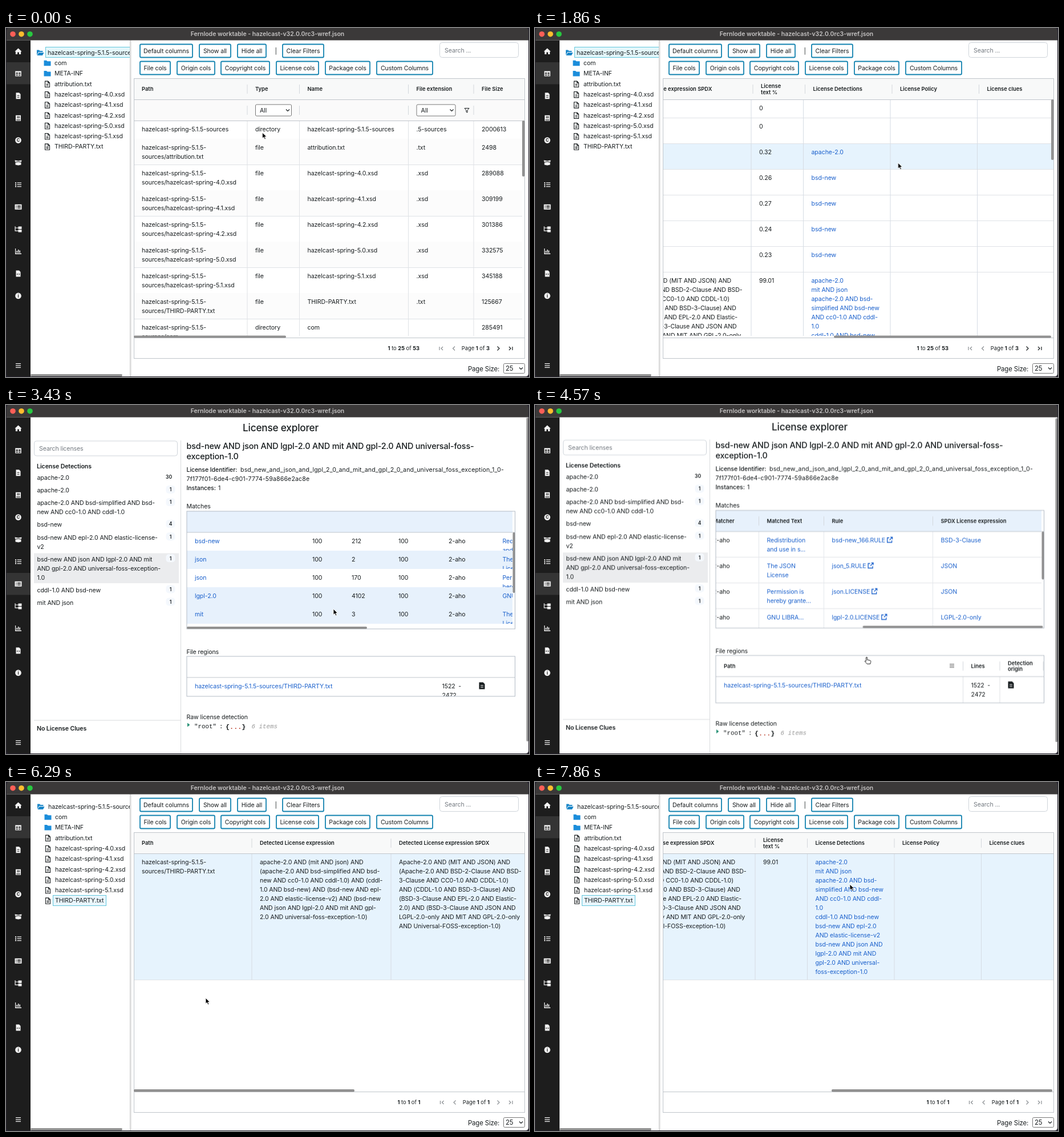
An HTML page that plays this animation: 917 by 611 pixels, repeating every 8000 ms.

```html
<!DOCTYPE html>
<html lang="en">
<head>
<meta charset="utf-8">
<title>License table</title>
<style>
html, body { margin: 0; width: 100%; height: 100%; overflow: hidden; background: #fff; }
#stage { display: block; width: 917px; height: 611px; }
text { font: 10.6px Inter, sans-serif; letter-spacing: -.1px; fill: #181d1f; white-space: pre; }
.head { font-size: 9.4px; font-weight: 600; letter-spacing: 0; }
.foot { font-size: 9.3px; letter-spacing: 0; }
.bold { font-weight: 600; }
.medium { font-weight: 500; }
.link { fill: #1a60cc; }
.hint { fill: #747a80; }
.ident { letter-spacing: .14px; }
.title { font-size: 17.2px; font-weight: 500; letter-spacing: -.2px; }
.name { font-size: 14.4px; font-weight: 500; letter-spacing: -.16px; }
.size { font-size: 11.3px; }
.badge { font-size: 8.6px; font-weight: 600; text-anchor: middle; }
.mono { font: 10.8px "Liberation Mono", monospace; letter-spacing: 0; }
.bar { font-weight: 600; font-size: 10.5px; letter-spacing: 0; fill: #c6c4c4; text-anchor: middle; }
.end { text-anchor: end; }
.mid { text-anchor: middle; }
.glyph { font-size: 7.5px; font-weight: 700; fill: #1e1e1e; text-anchor: middle; }
</style>
</head>
<body>
<svg id="stage" viewBox="0 0 917 611"></svg>
<script>
const FRAMES = 56, INK = '#181d1f', LINK = '#1a60cc', EDGE = '#c0c5cb', RULE = '#dfe2e6', THUMB = '#919191', HOVER = '#e6f3fd';
const stage = document.getElementById('stage');
const sheet = document.head.appendChild(document.createElement('style'));
let tracks = 0;

// --- drawing helpers; y of a text is its middle
function add(parent, tag, attrs = {}) {
  const node = document.createElementNS('http://www.w3.org/2000/svg', tag);
  for (const key in attrs) node.setAttribute(key, attrs[key]);
  return parent.appendChild(node);
}
const group = (p, x = 0, y = 0) => add(p, 'g', { transform: `translate(${x} ${y})` });
const rect = (p, x, y, width, height, fill, more) => add(p, 'rect', { x, y, width, height, fill, ...more });
const frame = (p, x, y, w, h, stroke, more) => rect(p, x + .5, y + .5, w - 1, h - 1, 'none', { stroke, ...more });
const clip = (p, x, y, width, height) => add(p, 'svg', { x, y, width, height, viewBox: `${x} ${y} ${width} ${height}` });
const shape = (p, x, y, d, fill = INK) => add(p, 'path', { d, fill, 'fill-rule': 'evenodd', transform: `translate(${x} ${y})` });
const stroke = (p, x, y, d, color = INK, width = 1.2) =>
  add(p, 'path', { d, fill: 'none', stroke: color, 'stroke-width': width, transform: `translate(${x} ${y})` });
const thumb = (p, x, y, w, h) => rect(p, x, y, w, h, THUMB, { rx: 2 });
function text(p, x, y, content, cls = '') {
  const node = add(p, 'text', { x, y, dy: '.36em', class: cls });
  node.innerHTML = content;
  return node;
}
const lines = (p, x, y, list, cls, step = 16) => list.forEach((s, i) => text(p, x, y + i * step, s, cls));
const tick = (p, x, y) => rect(p, x - .5, y - 8, 1, 16, '#d3d7dc');

// --- motion helpers; stops are [step, ...values], stepped at seven pictures a second
function play(node, stops, css, hold) {
  const name = 'track' + tracks++;
  const keys = stops.map(([n, ...v], i) => {
    const count = hold ? 1 : (stops[i + 1]?.[0] ?? FRAMES) - n;
    return `${n / FRAMES * 100}%{${css(...v)};animation-timing-function:steps(${count})}`;
  });
  keys.push(`100%{${css(...stops.at(-1).slice(1))}}`);
  sheet.append(`@keyframes ${name}{${keys.join('')}}\n`);
  node.style.animation = `${name} 8s -5ms infinite`;
}
const move = (node, ...stops) => play(node, stops, (x, y = 0) => `transform:translate(${x}px,${y}px)`);
function show(node, ...ranges) {
  const stops = ranges[0][0] ? [[0, 0]] : [];
  for (const [from, to] of ranges) {
    stops.push([from, 1]);
    if (to < FRAMES) stops.push([to, 0]);
  }
  play(node, stops, o => `opacity:${o}`, true);
  return node;
}

const DOC = 'M-4-5.5H1.5L4-3V5.5H-4ZM-2-1V0H2V-1ZM-2 2V3H2V2Z';
const DOWN = 'M-3-1.5L0 1.5 3-1.5';
const MENU = 'M-4.5-4h9v1.3h-9zM-4.5-.6h9v1.3h-9zM-4.5 2.7h9V4h-9z';
const DISC = 'M-5.3 0a5.3 5.3 0 1 0 10.6 0a5.3 5.3 0 1 0-10.6 0Z';

function select(p, x, y, w, h, label, cls) {
  rect(p, x, y, w, h, '#fff');
  frame(p, x, y, w, h, '#777', { rx: 2 });
  text(p, x + (cls ? 4 : 8), y + h / 2, label, cls);
  stroke(p, x + w - 7, y + h / 2, DOWN);
}

// --- table page
rect(stage, 0, 0, 917, 611, '#fff');
const table = group(stage);

function fileTree() {
  const view = clip(table, 43, 21, 174, 590);
  const box = { stroke: '#62c6dc' };
  show(rect(view, 69.5, 33.5, 160, 18, '#e4f7fb', box), [0, 23]);
  show(rect(view, 82.5, 198.5, 93, 18, '#e9f6fd', box), [23, FRAMES]);
  const tree = group(view);
  shape(tree, 60, 43.5, 'M-6-5H-2L-.5-3.5H4.5V-1.5H-3L-6 4ZM-2.5-.5H6.5L4 4.5H-5.5Z', '#1b87c9');
  text(tree, 73, 43, 'hazelcast-spring-5.1.5-sources');
  const names = ['com', 'META-INF', 'attribution.txt', ...['4.0', '4.1', '4.2', '5.0', '5.1'].map(v => `hazelcast-spring-${v}.xsd`), 'THIRD-PARTY.txt'];
  names.forEach((name, i) => {
    const y = 61.3 + i * 18.28;
    if (i < 2) shape(tree, 72.5, y + .5, 'M-6-5H-1.5L0-3.5H6V4.5H-6Z', '#1b8ddb');
    else stroke(tree, 72.5, y + .5, 'M-4-5.2H1.2L4-2.4V5.2H-4ZM1-5V-2.2H4M-2 .3H2M-2 2.6H2', INK, 1.1);
    text(tree, 85, y, name);
  });
  move(tree, [0, 0], [22, 0], [23, 1]);
  thumb(table, 43, 606, 161, 4);
  ['#cfcfcf', '#e2e2e2', '#eee', '#f7f7f7'].forEach((c, i) => rect(table, 217 + i, 21, 1, 590, c));
}

function toolbar() {
  const button = (x, right, y, label) => {
    rect(table, x + 1, y + 1, right - x - 2, 23, '#fff', { rx: 2, stroke: '#1483b0', 'stroke-width': 1.8 });
    text(table, (x + right) / 2, y + 12.2, label, 'mid');
  };
  [[234, 328, 'Default columns'], [338, 395, 'Show all'], [405, 457, 'Hide all'], [484, 558, 'Clear Filters']].forEach(([a, b, s]) => button(a, b, 27.5, s));
  [[234, 289, 'File cols'], [299, 367, 'Origin cols'], [376, 463, 'Copyright cols'], [473, 549, 'License cols'],
    [559, 639, 'Package cols'], [649, 749, 'Custom Columns']].forEach(([a, b, s]) => button(a, b, 57.5, s));
  text(table, 471.5, 40, '|');
  frame(table, 760, 25, 139, 27, '#cfd4da', { rx: 4 });
  text(table, 769, 39, 'Search ...', 'hint');
}

function gridShell() {
  frame(table, 224, 88, 686, 491, EDGE);
  rect(table, 224, 542, 686, 1, EDGE);
  text(table, 810, 596.5, 'Page Size:', 'size');
  select(table, 872, 587, 38, 18, '25', 'size');
  const footer = (shift, total, pages, range) => {
    const g = show(group(table), range);
    const b = s => `<tspan font-weight="700">${s}</tspan>`;
    text(g, 725 + shift, 561, `${b(1)} to ${b(total)} of ${b(total > 1 ? 53 : 1)}`, 'foot end');
    text(g, 848, 561, `Page ${b(1)} of ${b(pages)}`, 'foot end');
    const next = pages > 1 ? INK : '#8b8f93';
    stroke(g, 763 + shift, 561, 'M-3-3V3M3-3L0 0 3 3', '#8b8f93');
    stroke(g, 785 + shift, 561, 'M2-3.5L-1.5 0 2 3.5', '#8b8f93');
    stroke(g, 863, 561, 'M-1.5-3.5L2 0-1.5 3.5', next);
    stroke(g, 885, 561, 'M-3-3L0 0-3 3M3-3V3', next);
  };
  footer(0, 25, 3, [0, 23]);
  footer(1.5, 1, 1, [23, FRAMES]);
}

function headerBand(p) {
  rect(p, 225, 89, 684, 36, '#f8f9f9');
  rect(p, 224, 125, 686, 1, EDGE);
}

function defaultGrid() {
  const g = show(group(table), [0, 9]);
  headerBand(g);
  rect(g, 225, 126, 684, 36, '#fafafa');
  rect(g, 224, 162, 686, 1, EDGE);
  [[238, 'Path'], [437, 'Type'], [528.5, 'Name'], [719.5, 'File extension'], [834, 'File Size']].forEach(([x, s]) => text(g, x, 107, s, 'head'));
  const columns = [423, 514.5, 705.5, 820];
  columns.forEach(x => { tick(g, x, 107); tick(g, x, 144); });
  select(g, 437, 133.5, 64, 21, 'All');
  select(g, 719.5, 133.5, 69, 21, 'All');
  stroke(g, 808, 144, 'M-4-3.5H4L1 0V4L-1 3V0Z', INK, 1);
  const body = clip(g, 225, 163, 680, 376);
  const file = (name, size) => [name, 'file', '.' + name.split('.').pop(), size];
  const spring = (v, size) => file(`hazelcast-spring-${v}.xsd`, size);
  const rows = [['', 'directory', '.5-sources', 2000613], file('attribution.txt', 2498), spring('4.0', 289088), spring('4.1', 309199), spring('4.2', 301386),
    spring('5.0', 332575), spring('5.1', 345188), file('THIRD-PARTY.txt', 125667), ['com', 'directory', '', 285491]];
  let y = 162;
  rows.forEach(([name, type, ext, size], i) => {
    const h = i ? 45 : 32, root = 'hazelcast-spring-5.1.5-';
    if (i % 2) rect(body, 224, y, 686, h, '#fcfcfc');
    lines(body, 238, y + 15, i ? [root, 'sources/' + name] : [root + 'sources']);
    text(body, 437, y + 15, type);
    text(body, 528.5, y + 15, name || root + 'sources');
    text(body, 719.5, y + 15, ext);
    text(body, 834, y + 15, size);
    y += h;
    rect(body, 224, y, 686, 1, RULE);
  });
  columns.forEach(x => rect(body, x - .5, 162, 1, 380, RULE));
  thumb(g, 224, 538.5, 267, 4);
  thumb(g, 905, 162, 4.5, 98);
}

const LONG = {
  name: 'THIRD-PARTY.txt', pct: '99.01', height: 221,
  expr: ['apache-2.0 AND (mit AND json) AND', '(apache-2.0 AND bsd-simplified AND bsd-', 'new AND cc0-1.0 AND cddl-1.0) AND (cddl-', '1.0 AND bsd-new) AND (bsd-new AND epl-',
    '2.0 AND elastic-license-v2) AND (bsd-new', 'AND json AND lgpl-2.0 AND mit AND gpl-', '2.0 AND universal-foss-exception-1.0)'],
  spdx: ['Apache-2.0 AND (MIT AND JSON) AND', '(Apache-2.0 AND BSD-2-Clause AND BSD-', '3-Clause AND CC0-1.0 AND CDDL-1.0)', 'AND (CDDL-1.0 AND BSD-3-Clause) AND',
    '(BSD-3-Clause AND EPL-2.0 AND Elastic-', '2.0) AND (BSD-3-Clause AND JSON AND', 'LGPL-2.0-only AND MIT AND GPL-2.0-only', 'AND Universal-FOSS-exception-1.0)'],
  found: ['apache-2.0', 'mit AND json', 'apache-2.0 AND bsd-', 'simplified AND bsd-new', 'AND cc0-1.0 AND cddl-', '1.0', 'cddl-1.0 AND bsd-new',
    'bsd-new AND epl-2.0', 'AND elastic-license-v2', 'bsd-new AND json AND', 'lgpl-2.0 AND mit AND', 'gpl-2.0 AND universal-', 'foss-exception-1.0']
};

function licenseGrid(range, rows) {
  const g = show(group(table), range);
  headerBand(g);
  const head = group(clip(g, 225, 89, 684, 36));
  [[14, 'Path'], [221, 'Detected License expression'], [465, 'Detected License expression SPDX'], [800.5, 'License Detections'],
    [953, 'License Policy'], [1105.5, 'License clues']].forEach(([x, s]) => text(head, 224 + x, 107, s, 'head'));
  lines(head, 933, 102, ['License', 'text %'], 'head', 10.5);
  const columns = [207, 451, 695, 786.5, 939, 1091.5].map(x => 224 + x);
  columns.forEach(x => tick(head, x, 107));
  const view = clip(g, 225, 126, 684, 413), hover = group(view), body = group(view), rules = group(view);
  let y = 125;
  for (const row of rows) {
    lines(body, 238, y + 15, row.name ? ['hazelcast-spring-5.1.5-', 'sources/' + row.name] : ['hazelcast-spring-5.1.5-sources']);
    lines(body, 445, y + 15, row.expr);
    lines(body, 689, y + 15, row.spdx);
    text(body, 933, y + 15, row.pct);
    lines(body, 1024.5, y + 15, row.found, 'link');
    y += row.height;
    rect(body, 224, y, 1230, 1, RULE);
  }
  columns.forEach(x => rect(rules, x - .5, 125, 1, y - 125, '#d5dce4'));
  return { g, head, hover, body, rules };
}

function licenseTables() {
  const row = (name, pct, id, spdx, height = 45) => ({ name, pct, height, expr: id ? [id] : [], spdx: id ? [spdx] : [], found: id ? [id] : [] });
  const bsd = (v, pct) => row(`hazelcast-spring-${v}.xsd`, pct, 'bsd-new', 'BSD-3-Clause');
  const all = licenseGrid([9, 23], [row('', '0', '', '', 32), row('attribution.txt', '0'), row('hazelcast-spring-4.0.xsd', '0.32', 'apache-2.0', 'Apache-2.0'),
    bsd('4.1', '0.26'), bsd('4.2', '0.27'), bsd('5.0', '0.24'), bsd('5.1', '0.23'), LONG, row('com', '0'), row('com/hazelcast', '0'), row('META-INF', '0')]);
  for (const part of [all.body, all.rules]) move(part, [0, 0], [9, 0], [10, -80], [13, -540], [15, -540], [19, -540, -242]);
  move(all.head, [0, 0], [9, 0], [10, -50], [13, -537], [14, -540]);
  show(rect(all.hover, 224, 202, 686, 45, HOVER), [11, 15]);
  show(rect(all.hover, 224, 427, 686, 221, HOVER), [17, 23]);
  move(all.hover, [0, 0], [15, 0], [19, 0, -242]);
  move(thumb(all.g, 224, 538.5, 381, 4), [0, 0], [9, 0], [10, 44], [13, 300]);
  move(thumb(all.g, 905, 125, 4.5, 106), [0, 0], [15, 0], [19, 0, 62]);

  const one = licenseGrid([23, FRAMES], [LONG]);
  rect(one.hover, 224, 125, 686, 221, HOVER);
  move(one.body, [0, 0], [44, 0], [46, -533], [47, -533], [48, -60], [49, -166], [51, -533]);
  move(one.head, [0, 0], [44, 0], [46, -533], [47, -533], [48, -40], [49, -131], [52, -533]);
  move(one.rules, [0, 0], [44, 0], [46, -533]);
  move(thumb(one.g, 224, 538, 387, 4.5), [0, 0], [44, 0], [46, 296], [47, 296], [48, 34], [49, 90], [51, 296]);
}

fileTree();
toolbar();
gridShell();
defaultGrid();
licenseTables();

// --- license explorer
const explorer = show(clip(stage, 43, 21, 874, 590), [23, 44]);
rect(explorer, 43, 21, 874, 590, '#fff');
const page = group(explorer);
const pageStops = [[0, 0], [30, 0], [32, -1.5], [33, -1.5], [35, -18.5]];
move(page, ...pageStops.map(([n, y]) => [n, 0, y]));
move(thumb(explorer, 912.5, 22, 3.5, 567), ...pageStops.map(([n, y]) => [n, 0, -y * .93]));

function detectionList() {
  text(page, 481.5, 40, 'License explorer', 'title mid');
  rect(page, 306, 62, 1, 620, '#d9dbde');
  frame(page, 49, 62.5, 252, 27, '#cfd4da', { rx: 4 });
  text(page, 58, 76, 'Search licenses', 'hint');
  text(page, 54, 107, 'License Detections', 'bold');
  show(rect(page, 49, 259.5, 254, 52.5, '#ebecee'), [23, 36]);
  show(rect(page, 49, 313, 254, 21.5, '#e8ebee'), [36, 44]);
  const items = [[30, 'apache-2.0'], [1, 'apache-2.0'], [1, 'apache-2.0 AND bsd-simplified AND bsd-', 'new AND cc0-1.0 AND cddl-1.0'], [4, 'bsd-new'],
    [1, 'bsd-new AND epl-2.0 AND elastic-license-', 'v2'], [1, 'bsd-new AND json AND lgpl-2.0 AND mit', 'AND gpl-2.0 AND universal-foss-exception-', '1.0'],
    [1, 'cddl-1.0 AND bsd-new'], [1, 'mit AND json']];
  let y = 127.3;
  for (const [count, ...label] of items) {
    lines(page, 54.5, y, label);
    if (count < 30) rect(page, 280.5, y - 8.5, 16, 14, '#f4f8fd', { rx: 5 });
    text(page, count < 30 ? 288.5 : 285.5, y - 1.2, count, 'badge');
    y += 6.1 + 16 * label.length;
  }
  rect(page, 49, 551.5, 257, 1, '#d9dbde');
  text(page, 54, 566.5, 'No License Clues', 'bold');
}

function detail(range, d) {
  const g = show(group(page), range);
  lines(g, 316.5, 72.3, d.name, 'name', 18);
  let y = 77.3 + 18 * d.name.length;
  text(g, 316.5, y, 'License Identifier:', 'medium');
  text(g, 411, y, d.id[0], 'ident');
  if (d.id[1]) text(g, 316.5, y + 16, d.id[1], 'ident');
  y += 16 * d.id.length;
  text(g, 316.5, y, 'Instances:', 'medium');
  text(g, 372, y, '1');
  text(g, 316.5, y + 32, 'Matches');

  const top = Math.round(y + 40.5), bottom = top + d.height, inner = d.tall ? 571 : 575;
  const view = clip(g, 317, top, inner, d.height);
  rect(view, 317, top, 576, 37, d.tint);
  const body = group(view);
  const columns = [0, 206, 275, 357, 445, 539.5, 653.5, 844.5].map(x => 317 + x);
  if (!d.loading) ['License expression', 'Score', 'Length', 'Coverage', 'Matcher', 'Matched Text', 'Rule', 'SPDX License expression'].forEach((s, i) => {
    text(body, columns[i] + 14, top + 18.5, s, 'head');
    if (i) tick(body, columns[i], top + 18.5);
  });
  let rowTop = top + 37;
  d.rows.forEach(([id, len, matcher, matched, rule, spdx], i) => {
    const cell = (col, s, cls) => text(body, columns[col] + 14, rowTop + 15, s, cls);
    const h = d.loading ? 32 : Math.max(45, 13 + 16 * matched.length);
    if (d.loading && i !== 0 && i !== 2) rect(body, 317, rowTop, 1040, h, d.tint);
    cell(0, id, 'link');
    cell(1, 100); cell(2, len); cell(3, 100); cell(4, matcher);
    lines(clip(body, columns[5], rowTop, 114, h), columns[5] + 14, rowTop + 15, matched, 'link');
    const label = cell(6, rule, 'link');
    stroke(body, columns[6] + 22 + label.getComputedTextLength(), rowTop + 14.5, 'M-1-3.5H-4.5V4.5H3.5V1M1-4.5H4.5V-1M4.5-4.5L-.5.5', LINK, 1.3);
    cell(7, spdx, 'link');
    rowTop += h;
    if (!d.loading) rect(body, 317, rowTop - .5, 1040, 1, RULE);
  });
  if (!d.loading) columns.slice(1).forEach(x => rect(body, x - .5, top + 37, 1, d.height, '#e3e7ec'));
  rect(g, 317, top + 36.5, 576, 1, EDGE);
  frame(g, 316.5, top - .5, 576.5, d.height + 1, '#b4bcc6');
  if (d.tall) thumb(g, 888.5, top + 37, 4, d.loading ? 106 : 84);
  const bar = thumb(g, 317, bottom - 4, d.tall ? 316 : 319, 4);
  move(body, ...d.scroll);
  move(bar, ...d.scroll.map(([n, x]) => [n, -x * .555]));

  text(g, 316.5, bottom + 40, 'File regions');
  const box = bottom + 48, boxHeight = d.loading ? 70 : 83, files = clip(g, 317, box, 576, boxHeight);
  if (!d.loading) {
    text(files, 331, box + 18.5, 'Path', 'head');
    shape(files, 731, box + 18, 'M-4-3.2h8v1h-8zM-4-.5h8v1h-8zM-4 2.2h8v1h-8z', '#555');
    text(files, 764.5, box + 18.5, 'Lines', 'head');
    lines(files, 829, box + 13.5, ['Detection', 'origin'], 'head', 10.5);
    [750.5, 815, 891].forEach(x => tick(files, x, box + 18.5));
    [750.5, 815].forEach(x => rect(files, x - .5, box + 37, 1, 46, RULE));
  }
  rect(files, 317, box + 36.5, 576, 1, EDGE);
  text(files, 331, box + 52, 'hazelcast-spring-5.1.5-sources/THIRD-PARTY.txt', 'link');
  lines(files, 764.5, box + 52, [d.span[0] + '\u00a0\u00a0-', d.span[1]]);
  shape(files, 834.5, box + 51.5, 'M-5-6H2L5-3V6H-5ZM-2.5-1V0H2.5V-1ZM-2.5 2V3H2.5V2Z');
  frame(g, 316.5, box - .5, 576.5, boxHeight + 1, '#b4bcc6');

  const raw = box + boxHeight + 36;
  text(g, 316.5, raw, 'Raw license detection');
  shape(g, 320, raw + 14, 'M-2-3.5L2.5 0-2 3.5Z', d.arrow);
  text(g, 330, raw + 16.3, '"root"', 'mono');
  text(g, 374, raw + 16.3, ':', 'mono');
  text(g, 385, raw + 16.3, '<tspan font-weight="700">{<tspan fill="#b5301c">...</tspan>}</tspan>', 'mono').style.fontSize = '11.8px';
  text(g, 430.5, raw + 16.3, '<tspan font-style="italic" fill="#999">6 items</tspan>', 'mono');
}

detectionList();
const combined = {
  name: ['bsd-new AND json AND lgpl-2.0 AND mit AND gpl-2.0 AND universal-foss-', 'exception-1.0'],
  id: ['bsd_new_and_json_and_lgpl_2_0_and_mit_and_gpl_2_0_and_universal_foss_exception_1_0-', '7f177f01-6de4-c901-7774-59a866e2ac8e'],
  height: 206, tall: true, tint: '#e7f1fc', span: [1522, 2472], arrow: '#2a9277',
  rows: [['bsd-new', 212, '2-aho', ['Redistribution', 'and use in s...'], 'bsd-new_166.RULE', 'BSD-3-Clause'],
    ['json', 2, '2-aho', ['The JSON', 'License'], 'json_5.RULE', 'JSON'],
    ['json', 170, '2-aho', ['Permission is', 'hereby grante...'], 'json.LICENSE', 'JSON'],
    ['lgpl-2.0', 4102, '2-aho', ['GNU LIBRA...'], 'lgpl-2.0.LICENSE', 'LGPL-2.0-only'],
    ['mit', 3, '2-aho', ['The MIT', 'License'], 'mit_30.RULE', 'MIT']]
};
detail([23, 25], { ...combined, loading: true, scroll: [[0, 0]] });
detail([25, 36], { ...combined, scroll: [[0, 0], [26, 0], [31, -464]] });
detail([36, 44], {
  name: ['cddl-1.0 AND bsd-new'], id: ['cddl_1_0_and_bsd_new-9e6d52c5-3187-cfd8-4a75-b84523a02a82'],
  height: 148, tint: '#fcfcfd', span: [1077, 1145], arrow: '#3a78c2', scroll: [[0, -461]],
  rows: [['cddl-1.0', 20, '3-seq', ['granted to You', 'by any dis...'], 'cddl-1.0_9.RULE', 'CDDL-1.0'],
    ['bsd-new', 3, '2-aho', ['Eclipse', 'Distribution', 'Licens...'], 'edl-1.0_1.RULE', 'BSD-3-Clause']]
});

// --- window chrome
rect(stage, 0, 0, 917, 21.5, '#3b3939');
['#fe5f57', '#febc2e', '#28c840'].forEach((fill, i) => add(stage, 'circle', { cx: 12 + 15 * i, cy: 10.7, r: 4.8, fill }));
text(stage, 458.5, 10.5, 'Fernlode worktable - hazelcast-v32.0.0rc3-wref.json', 'bar');
rect(stage, 0, 21.5, 43, 590, '#1d1d1d');
move(rect(stage, 1, 60, 42, 38.5, '#343434'), [0, 0], [22, 0], [23, 0, 234], [43, 0, 234], [44, 0]);
const icons = [
  'M-6.2.3L0-5.5 6.2.3H4.6V5H1.4V1.5H-1.4V5H-4.6V.3Z',
  'M-5.3-4.5H5.3V4.5H-5.3ZM-4-1.8V.4H-.6V-1.8ZM.6-1.8V.4H4V-1.8ZM-4 1.5V3.3H-.6V1.5ZM.6 1.5V3.3H4V1.5Z',
  DOC,
  'M-4.5-5H4.5V5H-4.5ZM-2.5-3V-2H3V-3ZM-2.5-1V0H3V-1ZM-3.3 2.5V3.7H3.5V2.5Z',
  DISC,
  'M-6-4L0-3 6-4 5.5-1 0-2-5.5-1ZM-5 0L0-1 5 0V4L0 5-5 4Z',
  'M-5.5-4.2h2v2h-2zM-2-3.8H5.5V-2.6H-2ZM-5.5-1h2v2h-2zM-2-.6H5.5V.6H-2ZM-5.5 2.2h2v2h-2zM-2 2.6H5.5V3.8H-2Z',
  'M-6-4.5H6V4.5H-6ZM-4-2.6v1.2h1.3v-1.2zM-1.5-2.6v1.2h5.8v-1.2zM-4-.5V.6h1.3V-.5zM-1.5-.5V.6h5.8V-.5zM-4 1.6v1.2h1.3V1.6zM-1.5 1.6v1.2h5.8V1.6z',
  'M-6-5h1.2v2.2H0V-4.8H6V-.3H0V-1.6H-4.8V2.4H0V.8H6V5.3H0V3.6H-6Z',
  'M-5.5-5h1.2V3.5H5.5V4.8H-5.5ZM-3-1h1.5V2.5H-3ZM-.5-3H1V2.5H-.5ZM2-1.5H3.5V2.5H2Z',
  'M-4-5.5H1.5L4-3V5.5H-4ZM-1-.8L-2.8 1-1 2.8V1.4L-1.4 1-1 .6ZM1-.8L2.8 1 1 2.8V1.4L1.4 1 1 .6Z',
  DISC];
icons.forEach((d, i) => shape(stage, 21.5, 41 + i * 38.9, d, '#f4f4f4'));
text(stage, 21.5, 196.5, 'C', 'glyph');
text(stage, 21.5, 469, 'i', 'glyph');
shape(stage, 21.5, 591, MENU, '#f4f4f4');
shape(stage, 0, 0, 'M0 0H917V611H0ZM6 0H911Q916 0 916 5V605Q916 610 911 610H6Q1 610 1 605V5Q1 0 6 0Z', '#24212c');

// --- pointer
const pointer = group(stage);
const outline = { stroke: '#fff', 'stroke-width': .9, 'stroke-linejoin': 'round' };
show(add(pointer, 'path', { d: 'M0 0V10.3L2.4 8.1 4.1 11.9 5.9 11.1 4.3 7.4H7.5Z', fill: '#000', ...outline }), [0, 20], [23, 31], [34, 36], [44, FRAMES]);
show(add(pointer, 'path', {
  d: 'M-1 1Q0-.6 1 1V5L6 6.2Q7.6 6.8 7.2 8.6L6.3 12.3H.6L-3 8Q-3.4 6.6-1.8 7L-1 7.6Z',
  fill: '#fff', stroke: '#222', 'stroke-width': 1
}), [20, 23], [31, 34], [36, 44]);
move(pointer, [0, 449.5, 183], [2, 452, 178], [7, 510, 74], [8, 511, 76], [9, 514, 82], [13, 636.5, 236], [16, 628, 270], [22, 572, 352],
  [24, 574, 357], [29, 580, 400], [32, 581.5, 441], [35, 140, 306], [37, 150, 308], [40, 335, 358.5], [42, 345, 378], [44, 350, 378], [49, 541, 293], [55, 552, 179]);
</script>
</body>
</html>
```
